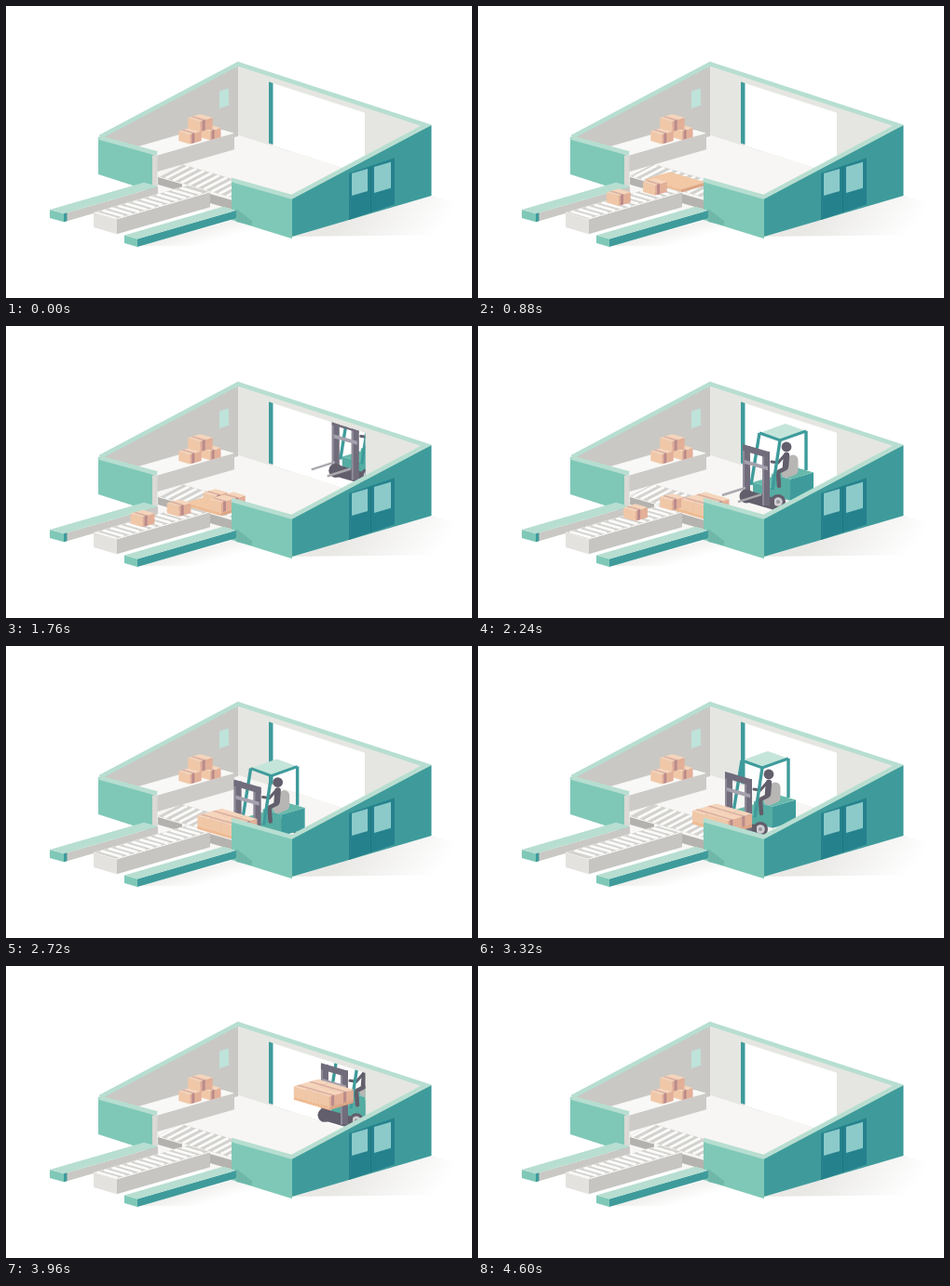
Animation, 500 px wide and 314 px high, one loop 5.4 s. Source, as an HTML page with a canvas:

```html
<!DOCTYPE html>
<html lang="en">
<head>
<meta charset="utf-8">
<title>Loading bay</title>
<style>
html, body { margin: 0; width: 100%; height: 100%; overflow: hidden; background: #fff; }
canvas { display: block; width: 500px; height: 314px; }
</style>
</head>
<body>
<canvas id="stage"></canvas>
<script>
const LOOP = 5400, STEP = 40;
const U = 0.29, V = -0.29;            // slopes of the two ground axes
const BELT_SPEED = 0.128, CARTON_GAP = 39, LIFT = 17;
const MINT = '#b7ded1', GREEN = '#7fc8b7', TEAL = '#3f9b9b', DEEP = '#25828d', GLASS = '#8ccaca';
const GRAY = '#c9c8c4', PALE = '#e5e6e1', WHITE = '#fbfbfa', MAST = '#716c7c', DARK = '#625e6b';

const canvas = document.getElementById('stage');
const ctx = canvas.getContext('2d');
const ratio = window.devicePixelRatio || 1;
canvas.width = 500 * ratio;
canvas.height = 314 * ratio;

const clamp = v => Math.max(0, Math.min(1, v));
const smooth = v => { v = clamp(v); return v * v * (3 - 2 * v); };
const ramp = (t, from, to) => smooth((t - from) / (to - from));
const down = ([x, y], h) => [x, y + h];

function path(points) {
  ctx.beginPath();
  points.forEach(p => ctx.lineTo(...p));
}
function poly(color, ...points) {
  path(points);
  ctx.closePath();
  ctx.fillStyle = color;
  ctx.fill();
}
function line(color, width, ...points) {
  path(points);
  ctx.strokeStyle = color;
  ctx.lineWidth = width;
  ctx.stroke();
}
function disc(color, x, y, r) {
  ctx.beginPath();
  ctx.arc(x, y, r, 0, Math.PI * 2);
  ctx.fillStyle = color;
  ctx.fill();
}
function clipped(points, draw) {
  ctx.save();
  path(points);
  ctx.clip();
  draw();
  ctx.restore();
}

// Parallelogram corners, upright face, and block with left, right and top colours
const quad = (x, y, [ax, ay], [bx, by]) => [[x, y], [x + ax, y + ay], [x + ax + bx, y + ay + by], [x + bx, y + by]];
const face = (color, x, y, w, slope, h) => poly(color, ...quad(x, y, [w, w * slope], [0, h]));
function block(x, y, a, b, h, left, right, top) {
  face(left, x, y, a, U, h);
  face(right, x + a, y + a * U, b, V, h);
  poly(top, ...quad(x, y, [a, a * U], [b, b * V]));
}

// Carton centred on its footprint
function carton(cx, cy, scale = 1) {
  ctx.save();
  ctx.translate(cx, cy);
  ctx.scale(scale, scale);
  block(-12.9, -11, 12.7, 13, 11, '#f0c8a8', '#e2af97', '#f5d5bc');
  poly('#dcb1a1', ...quad(-10, -11.8, [12.7, 12.7 * U], [3, 3 * V]));
  face('#b98b8c', 2, -8.1, 3, V, 11);
  ctx.restore();
}

function belt(x, y, along, across, count, phase) {
  const area = quad(x, y, along, across);
  poly('#d3d2ce', ...area);
  clipped(area, () => {
    for (let i = 0; i < count; i++) {
      const k = (i + phase) / count;
      const px = x + along[0] * k, py = y + along[1] * k;
      line(WHITE, 2.8, [px, py], [px + across[0], py + across[1]]);
    }
  });
}

// Distance of the forklift from where it starts to raise the load
function truckOffset(t) {
  if (t < 2240) return 19 + 0.137 * (2240 - t);
  if (t < 2840) return -22 + 41 * (1 - (t - 2240) / 600) ** 2;
  if (t < 3320) return -22 + 22 * clamp((t - 2920) / 400) ** 2;
  return 0.114 * (t - 3320) + 0.011 * Math.max(0, t - 3960);
}
const liftAt = t => LIFT * ramp(t, 3320, 3960);

function palletAt(t, off) {
  if (t < 2920) {
    const shift = 12.7 * (ramp(t, 1410, 1570) + ramp(t, 2020, 2180)) - 80 * (1 - clamp(t / 560));
    return [180 + shift, 186 + shift * U];
  }
  return [230 + 1.08 * off, 188 - (off < 0 ? 0.21 : 0.42) * off - liftAt(t)];
}

const pallet = ([x, y]) => block(x, y, 38, 26, 3.5, '#efbb93', '#dda585', '#f3c8a4');

// Two cartons fill each column of the pallet, far row first
function cartons(t, [px, py]) {
  const list = [];
  for (let i = 0; i < 6; i++) {
    const col = 2 - (i >> 1), row = 1 - i % 2;
    const x = 190 - CARTON_GAP * i + BELT_SPEED * (t - 880);
    if (x < 114) continue;
    const moving = x < 218 + 13 * row;
    list.push(moving
      ? [x, 200 + (x - 190) * V, clamp((x - 114) / 16)]
      : [px + 12.9 + 12.7 * col + 13 * row, py + 12.7 * U * col + 13 * V * row]);
  }
  list.sort((a, b) => a[1] - b[1]).forEach(c => carton(...c));
}

function wheel(x, y, r) {
  disc(DARK, x, y, r);
  disc('#cfced1', x, y, r * 0.6);
  disc('#9996a0', x, y, r * 0.25);
}

function driver(x, y) {
  ctx.lineCap = ctx.lineJoin = 'round';
  line('#b7b6b4', 11, [x + 7, y + 14], [x + 7, y + 25], [x, y + 28]);
  line(DARK, 6.5, [x, y + 9], [x - 1, y + 21]);
  line(DARK, 4.5, [x - 1, y + 23], [x - 9, y + 27], [x - 8, y + 42]);
  line(DARK, 3, [x - 2, y + 9], [x - 9, y + 17], [x - 16, y + 16]);
  disc(DARK, x, y, 5.4);
  ctx.lineCap = 'butt';
  ctx.lineJoin = 'miter';
}

function truck(off, lift) {
  ctx.save();
  ctx.translate(off, -0.42 * off);
  wheel(334, 189, 6);
  block(276, 176, 22, 20, 14, '#55aca2', TEAL, '#67b9ab');
  block(296, 167, 20, 25, 23, '#55aca2', TEAL, '#67b9ab');
  driver(312, 138);

  // cab
  const roof = quad(283, 123, [22, 8], [28, -10]);
  const [left, front, right] = roof;
  line(TEAL, 3.4, right, down(right, 42));
  line(TEAL, 3.4, left, [left[0] - 9, left[1] + 56]);
  line(TEAL, 3.4, front, [front[0] - 8, front[1] + 53]);
  poly('#c5e5da', ...roof);
  line(TEAL, 3, left, front, right);

  // mast
  wheel(303, 197, 8);
  face(DARK, 265, 183, 34, U, 13);
  for (const x of [265, 286]) {
    face(MAST, x, 137 + (x - 265) * U, 8, 0, 58);
    face('#8f8b99', x, 137 + (x - 265) * U, 2, 0, 58);
  }
  face(MAST, 265, 135, 29, U, 7);
  face('#a5a1ad', 267, 152, 25, U, 4);
  disc(DARK, 269, 191, 7.5);
  ctx.translate(0, -lift);
  for (const x of [243, 260]) {
    const y = 190 + (x - 243) * 0.42;
    line('#aaa8ad', 2.5, [x, y], [x + 25, y - 8]);
  }
  ctx.restore();
}

function fade(color, from, to, ...points) {
  const g = ctx.createLinearGradient(...from, ...to);
  g.addColorStop(0, color);
  g.addColorStop(1, '#fff');
  poly(g, ...points);
}

function room() {
  fade('#e9e8e5', [380, 205], [450, 260], [307, 248], [456, 203], [480, 212], [478, 246]);
  fade('#efeeec', [200, 240], [206, 259], [141, 258], [247, 230], [270, 238], [225, 258]);
  poly('#f7f6f4', [150, 168], [249, 139], [456, 204], [307, 248], [162, 205]);
  poly(GRAY, [103, 141], [249, 64], [249, 140], [150, 168]);
  poly(PALE, [249, 64], [450, 128], [456, 204], [249, 139]);
  face('#fff', 286, 83, 99, 0.32, 67);
  face(TEAL, 282, 81.5, 4.5, 0.32, 66);
  face('#bfe3da', 229, 91.5, 10, -0.3, 18.5);
}

function platform() {
  block(135, 153, 27, 83, 17.5, GRAY, '#cccbc7', '#f8f8f7');
  carton(219, 141, 0.9);
  carton(197.5, 145, 0.95);
  carton(208.5, 131.5, 1.03);
}

function leftSide() {
  face(GREEN, 99, 141, 59, 0.32, 40);
  line(MINT, 4.5, [100, 141.5], [162, 158.5]);
  face('#dad9d6', 157, 161, 5.5, V, 35);
  block(47, 219, 15, 101, 9, GREEN, GRAY, MINT);
  face(TEAL, 62, 223.3, 3.5, V, 9);
}

function mainConveyor(phase) {
  face('#b5b3af', 219, 202, 26, U, 10);
  block(94, 222, 25, 100, 16, '#e3e2df', '#c6c5c1', WHITE);
  belt(95, 222, [100, 100 * V], [23, 23 * U], 12, phase);
}

function frontSide() {
  face(GREEN, 242, 187, 65, 0.31, 43);
  poly('#6fb8a9', [247, 218], [264, 231], [264, 236], [247, 232]);
  poly(TEAL, [307, 207], [456.5, 128], [456.5, 204], [307, 248]);
  face(DEEP, 368, 180, 49, -0.34, 50);
  face('#1d7581', 391, 173, 1, V, 49);
  face(GLASS, 371, 180, 17, V, 24);
  face(GLASS, 395, 173, 18, V, 28);
  line(MINT, 4.6, [101, 140.8], [249, 62.3], [451, 128.3], [306.5, 205.3], [242, 187]);
  block(127, 246.5, 14, 106, 8.5, GREEN, TEAL, MINT);
}

function draw(t) {
  const off = truckOffset(t), base = palletAt(t, off);
  const phase = Math.min(t, 3920) * BELT_SPEED * 12 / 100 % 1;
  ctx.setTransform(ratio, 0, 0, ratio, 0, 0);
  ctx.fillStyle = '#fff';
  ctx.fillRect(0, 0, 500, 314);
  room();
  face('#b4b2ae', 163, 184, 26, U, 8);
  belt(163, 183, [82, 82 * U], [25, -13], 10, phase);
  if (t < 1000) pallet(base);
  platform();
  leftSide();
  mainConveyor(phase);
  // The doorway hides whatever is still outside
  clipped([[0, -9], [385.5, 115], [385.5, 314], [0, 314]], () => {
    if (off < 170) truck(off, liftAt(t));
    if (t >= 1000) pallet(base);
    cartons(t, base);
  });
  frontSide();
}

function tick() {
  const t = performance.now() % LOOP;
  draw(Math.floor(t / STEP) * STEP);
  requestAnimationFrame(tick);
}
tick();
</script>
</body>
</html>
```
